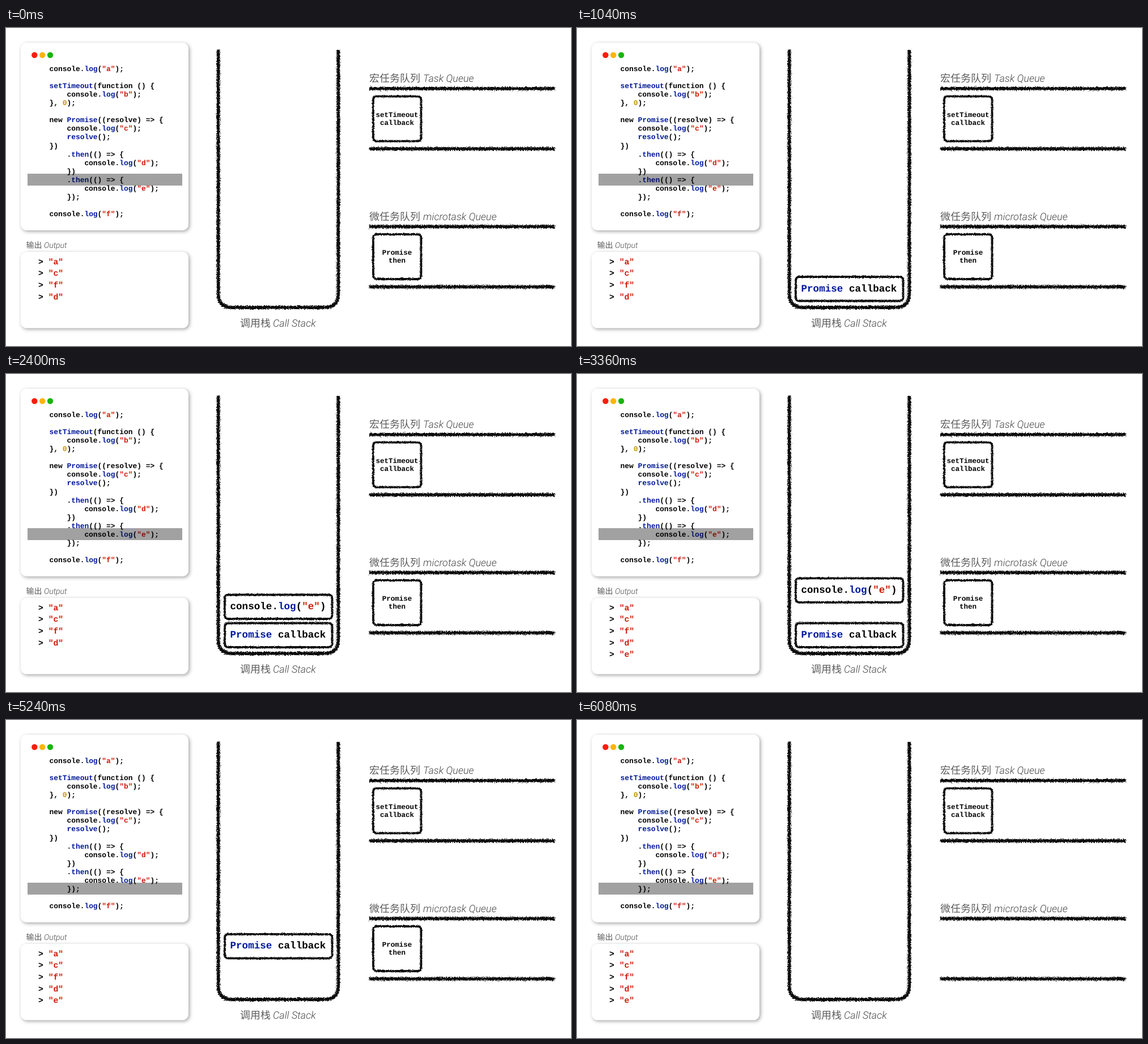
Animation of 997 by 561 pixels, one loop 6560 ms. Source, as an HTML page:

```html
<!DOCTYPE html>
<html lang="zh">
<head>
<meta charset="utf-8">
<title>Event loop</title>
<style>
  html, body { margin: 0; width: 100%; height: 100%; overflow: hidden; background: #fff; }
  svg { display: block; width: 997px; height: 561px; }
  text { white-space: pre; text-rendering: geometricPrecision; }
  .mono { font-family: "Liberation Mono", monospace; font-weight: bold; }
  .label { font-family: Roboto, "Noto Sans CJK SC", "Noto Sans CJK", sans-serif; font-weight: 300; fill: #5c5c5c; }
  .latin { font-style: italic; fill: #484848; }
  .string { fill: #cf1a05; }
  .name { fill: #00189a; }
  .number { fill: #c4960c; }
  .card { fill: #fff; filter: drop-shadow(2px 2px 3px rgba(0, 0, 0, .36)); }
  .ink { fill: none; stroke: #0c0c0c; filter: url(#rough); }
  rect.ink { filter: url(#fine); }
</style>
</head>
<body>
<svg id="stage" viewBox="0 0 997 561"></svg>
<script>
const LOOP = 6560;
const source = `console.log("a");

setTimeout(function () {
    console.log("b");
}, 0);

new Promise((resolve) => {
    console.log("c");
    resolve();
})
    .then(() => {
        console.log("d");
    })
    .then(() => {
        console.log("e");
    });

console.log("f");`;

const highlight = code => code.replace(
  /("\w")|\b(log|setTimeout|Promise|then|resolve(?=\(\)))\b|\b(0)\b/g,
  (word, string, name) => `<tspan class="${string ? "string" : name ? "name" : "number"}">${word}</tspan>`);

const mono = (x, y, size, content, anchor = "start") =>
  `<text class="mono" x="${x}" y="${y}" font-size="${size}" text-anchor="${anchor}">${content}</text>`;

const label = (x, latinX, y, size, chinese, latin) => `
  <text class="label" x="${x}" y="${y}" font-size="${size}">${chinese}</text>
  <text class="label latin" x="${latinX}" y="${y}" font-size="${size}">${latin}</text>`;

const ink = (path, width) => `<path class="ink" d="${path}" stroke-width="${width}"/>`;

const box = (x, y, w, h) =>
  `<rect class="ink" x="${x}" y="${y}" width="${w}" height="${h}" rx="6" stroke-width="3.8"/>`;

const queue = (y, name, latin) =>
  label(641, 736, y - 11.5, 18, name, latin) +
  ink(`M641 ${y}H968.5M641 ${y + 106.3}H968.5`, 5.8);

const task = (id, y, first, second) => `<g id="${id}">
  ${box(648, y, 84.5, 79)}
  ${mono(690, y + 36, 12.5, first, "middle")}
  ${mono(690, y + 50, 12.5, second, "middle")}</g>`;

const call = (id, y, content) => `<g id="${id}">
  ${box(386, y, 189.5, 42.5)}
  ${mono(395.5, y + 25.6, 17.6, highlight(content))}</g>`;

const output = (letter, row) => `<g id="out-${letter}">
  ${mono(57, 416.5 + row * 20.7, 14.7, "&gt; " + highlight(`"${letter}"`))}</g>`;

const roughen = (id, scale) => `
  <filter id="${id}" filterUnits="userSpaceOnUse" x="0" y="0" width="997" height="561" color-interpolation-filters="sRGB">
    <feTurbulence type="fractalNoise" baseFrequency=".55" numOctaves="2" seed="4"/>
    <feDisplacementMap in="SourceGraphic" scale="${scale}" xChannelSelector="R" yChannelSelector="G"/>
  </filter>`;

const $ = id => document.getElementById(id);

$("stage").innerHTML = `
  ${roughen("rough", 6)}
  ${roughen("fine", 3.5)}
  <rect class="card" x="26" y="26" width="296" height="331" rx="10"/>
  <rect class="card" x="26" y="395" width="296" height="134.5" rx="10"/>
  <circle cx="50.3" cy="47.7" r="5.2" fill="#f71e0c"/>
  <circle cx="64.2" cy="47.7" r="5.2" fill="#fdb409"/>
  <circle cx="78" cy="47.7" r="5.2" fill="#1ab50c"/>
  ${source.split("\n").map((line, i) => mono(76.5, 76 + i * 15.06, 12.9, highlight(line))).join("")}
  <rect id="marker" x="38" y="257" width="273" height="21" fill-opacity=".37"/>
  ${label(35.5, 67, 387.5, 14, "输出", "Output")}
  ${[..."acfde"].map(output).join("")}
  ${ink("M374.6 38V469Q374.6 493 399 493H562Q586.4 493 586.4 469V38", 5.8)}
  ${label(413, 471, 526.8, 18, "调用栈", "Call Stack")}
  ${queue(106.8, "宏任务队列", "Task Queue")}
  ${queue(350.4, "微任务队列", "microtask Queue")}
  ${call("callback", 439.5, "Promise callback")}
  ${call("log", 389.5, 'console.log("e")')}
  ${task("macro", 120.6, "setTimeout", "callback")}
  ${task("micro", 364, "Promise", "then")}`;

const progress = (t, start, end) => Math.min(1, Math.max(0, (t - start) / (end - start)));
const smooth = p => (1 - Math.cos(Math.PI * p)) / 2;
const move = (id, x, y) => $(id).setAttribute("transform", `translate(${x} ${y})`);

// Drops in while slowing down, later leaves upwards while speeding up.
const dropAndLift = (t, distance, [inStart, inEnd], [outStart, outEnd]) =>
  -distance * ((1 - progress(t, inStart, inEnd)) ** 4 + progress(t, outStart, outEnd) ** 4);

function draw() {
  const t = performance.now() % LOOP;
  move("callback", 0, dropAndLift(t, 510, [480, 1160], [4840, 5520]));
  move("log", 0, dropAndLift(t, 460, [1840, 2440], [3080, 3640]));
  move("micro", -745 * progress(t, 5520, 6080) ** 3, 0);
  move("marker", 0, 15 * (smooth(progress(t, 1160, 1840)) + smooth(progress(t, 4160, 4840))));
  $("out-e").setAttribute("opacity", progress(t, 2520, 2880));
  requestAnimationFrame(draw);
}
draw();
</script>
</body>
</html>
```
